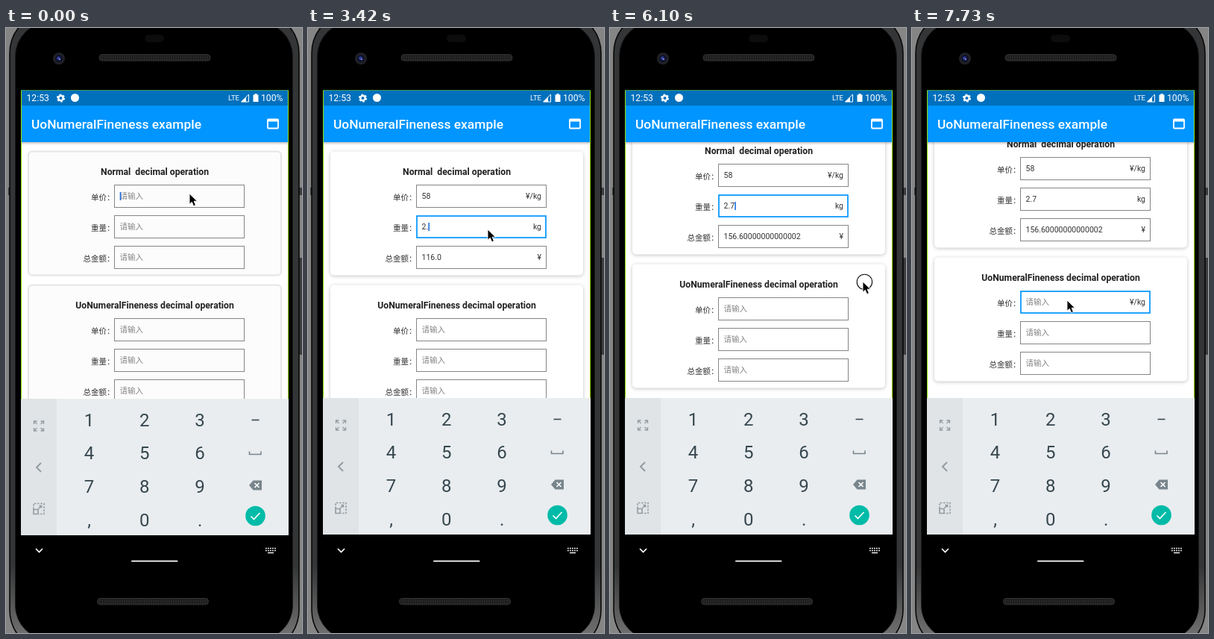
An HTML page for the animation above (8 s loop, 397 by 811 pixels).

```html
<!DOCTYPE html>
<html lang="zh-CN">
<head>
<meta charset="utf-8">
<title>Decimal operation demo</title>
<style>
  html, body { margin: 0; width: 100%; height: 100%; overflow: hidden; background: #858585; }
  svg { display: block; width: 397px; height: 811px; }
  text { font-family: Roboto, "Noto Sans CJK SC", "Noto Sans CJK", sans-serif; white-space: pre; }
  .bar { fill: #fff; font-size: 12.2px; }
  .title { fill: #fff; font-size: 17.4px; font-weight: 500; }
  .head { fill: #212121; font-size: 12.2px; font-weight: 700; text-anchor: middle; }
  .label, .value, .unit { fill: #333; font-size: 10.5px; }
  .label, .unit { text-anchor: end; }
  .empty { fill: #858585; }
  .box { fill: none; stroke: #858585; }
  .focus { stroke: #0095ff; stroke-width: 1.7; }
  .key { fill: #37474f; font-size: 24px; text-anchor: middle; }
  .line { fill: none; stroke-width: 1.6; }
  .card { fill: #fff; filter: drop-shadow(.5px 1px 2.5px rgba(0,0,0,.24)); }
  .flat .card { fill: #fcfcfc; stroke: #e5e5e5; stroke-width: 2; filter: none; }
</style>
</head>
<body>
<svg viewBox="0 0 397 811">
  <defs>
    <clipPath id="page"><rect x="20" y="153" width="359" height="344"/></clipPath>
    <pattern id="mesh" width="3" height="3" patternUnits="userSpaceOnUse">
      <rect width="3" height="3" fill="#292929"/><circle cx="1.5" cy="1.5" r=".9" fill="#111"/>
    </pattern>
    <linearGradient id="shade" x2="0" y2="1">
      <stop stop-color="#000" stop-opacity=".22"/><stop offset="1" stop-color="#000" stop-opacity="0"/>
    </linearGradient>
    <linearGradient id="metal" gradientUnits="userSpaceOnUse" x1="0" y1="720" x2="0" y2="811">
      <stop stop-color="#343537"/><stop offset="1" stop-color="#6e6e6e"/>
    </linearGradient>
  </defs>

  <!-- phone -->
  <rect width="397" height="811" fill="#858585"/>
  <g fill="#3c3d3e">
    <rect x="3" y="214" width="3" height="10"/>
    <rect x="393" y="214" width="4" height="10"/>
    <rect x="393" y="308" width="4" height="130"/>
  </g>
  <rect x="5" y="-22" width="388" height="858" rx="56" fill="url(#metal)" stroke="#080808" stroke-width="1.600"/>
  <rect x="12.5" y="-8" width="372" height="828" rx="46" fill="#000" stroke="#191a1b"/>
  <rect x="186" y="9" width="26" height="10" rx="5" fill="#0c0c0d"/>
  <rect x="125" y="35.500" width="149" height="8.500" rx="4" fill="url(#mesh)" stroke="#303030"/>
  <rect x="122.500" y="764.500" width="149" height="8.500" rx="4" fill="url(#mesh)" stroke="#303030"/>
  <circle cx="71" cy="41" r="8" fill="#202125"/>
  <circle cx="71" cy="41" r="5" fill="#10122b"/>
  <circle cx="70.500" cy="40.500" r="2.300" fill="#3443a0"/>
  <circle cx="72" cy="42" r="1" fill="#8d9be0"/>

  <!-- scrolling page -->
  <rect x="20" y="83" width="359" height="597" fill="#fff"/>
  <g clip-path="url(#page)"><g id="scroll"></g></g>

  <!-- status and title bars -->
  <rect x="20" y="83" width="359" height="21" fill="#0070bd"/>
  <rect x="20" y="104" width="359" height="49" fill="#0095ff"/>
  <rect x="20" y="153" width="359" height="4" fill="url(#shade)"/>
  <path d="M20.500 497V83.500H378.500V497" fill="none" stroke="#8fe000"/>
  <path d="M20 83.500H379" stroke="#3e9a50"/>
  <text class="bar" x="27.500" y="98.300">12:53</text>
  <g transform="translate(73.500 94)" stroke="#fff">
    <circle r="3.200" fill="none" stroke-width="2.400"/>
    <circle r="4.700" fill="none" stroke-width="1.800" stroke-dasharray="2.500 2.422"/>
  </g>
  <circle cx="92.500" cy="93.500" r="5.500" fill="#fff"/>
  <text class="bar" x="298" y="97.300" style="font-size:9.600px">LTE</text>
  <path d="M325.500 89V99H315.500Z" fill="none" stroke="#fff"/>
  <path d="M322 92.500V99H315.500Z" fill="#fff"/>
  <path d="M331.500 89.500h2v-1.500h3v1.500h2V99h-7Z" fill="#fff"/>
  <text class="bar" x="342" y="98.300">100%</text>
  <text class="title" x="34" y="135">UoNumeralFineness example</text>
  <rect x="351" y="122.500" width="14" height="12" rx="1" fill="none" stroke="#fff" stroke-width="1.800"/>
  <path d="M350.500 123.700h15" stroke="#fff" stroke-width="3.500"/>

  <!-- keyboard -->
  <rect x="20" y="679" width="359" height="50"/>
  <g id="keys">
    <rect x="20" y="496" width="359" height="183" fill="#e9edf0"/>
    <rect x="20" y="496" width="48" height="183" fill="#e0e4e7"/>
    <g class="line" stroke="#949ca1">
      <path stroke-width="1.300" d="M37.500 530v-4h4M37.500 526l4 4M46.500 526h4v4M50.500 526l-4 4M37.500 535v4h4M37.500 539l4-4M50.500 535v4h-4M50.500 539l-4-4"/>
      <path stroke-width="2" d="M47 582l-6 6 6 6"/>
      <path stroke-dasharray="2.500 1.700" d="M37 644v-7.500h14v14h-7"/>
      <path d="M37 644.500h6v6h-6ZM43.500 643.500l4-4M44.500 639.500h3v3"/>
    </g>
    <path class="line" stroke="#37474f" d="M329.500 524.500h10"/>
    <path class="line" stroke="#78858c" d="M326.500 566.500v4h15.500v-4"/>
    <path d="M331.500 605.500H343v13h-11.500l-5.500-6.500Z" fill="#78858c"/>
    <path class="line" stroke="#fff" d="M333.500 609l6 6m0-6l-6 6"/>
    <circle cx="334.500" cy="653" r="13.300" fill="#00bba8"/>
    <path class="line" stroke="#fff" stroke-width="2" d="M328.500 653.500l4 4 8-8.500"/>
  </g>
  <path class="line" stroke="#fff" d="M40 698l4.500 4.500L49 698"/>
  <rect x="168" y="713.700" width="62.500" height="1.800" rx=".9" fill="#fff"/>
  <path d="M348 697.500h14M348 700.500h14" stroke="#fff" stroke-width="1.600" stroke-dasharray="1.800 1.200"/>
  <path d="M351 703.500h8" stroke="#fff" stroke-width="1.400"/>

  <!-- pointer -->
  <g id="pointer">
    <circle id="ring" cx="2.400" cy=".4" r="10.200" fill="none" stroke="#111" stroke-width="1.100"/>
    <path d="M0 0V14.300L3.300 11.300L5.600 16.700L8.400 15.500L6.100 10.200H10.500Z" fill="#000" stroke="#fff" stroke-width=".9"/>
  </g>
</svg>
<script>
const NS = 'http://www.w3.org/2000/svg';
const $ = id => document.getElementById(id);
const LOOP = 8000;
const HINT = '请输入';
const LABELS = ['单价：', '重量：', '总金额：'];
const UNITS = ['¥/kg', 'kg', '¥'];

function add(parent, tag, attrs, text = '') {
  const el = document.createElementNS(NS, tag);
  for (const k in attrs) el.setAttribute(k, attrs[k]);
  el.textContent = text;
  parent.append(el);
  return el;
}

const fields = [];
function addCard(y, heading) {
  const g = add($('scroll'), 'g', { transform: `translate(0 ${y})` });
  add(g, 'rect', { class: 'card', x: 30, y: 0.5, width: 339, height: 166, rx: 5 });
  add(g, 'text', { class: 'head', x: 199.5, y: 31.5 }, heading);
  LABELS.forEach((label, i) => {
    const row = add(g, 'g', { transform: `translate(0 ${45 + 41 * i})` });
    add(row, 'text', { class: 'label', x: 145.5, y: 20.8 }, label);
    fields.push({
      box: add(row, 'rect', {}),
      value: add(row, 'text', { x: 152.5, y: 19.2 }),
      unit: add(row, 'text', { class: 'unit', x: 313, y: 19.2 }, UNITS[i]),
      caret: add(row, 'rect', { y: 10, width: 1.6, height: 11, fill: '#1f6fe0' })
    });
  });
}
addCard(165, 'Normal  decimal operation');
addCard(344, 'UoNumeralFineness decimal operation');

['123', '456', '789', ',0.'].forEach((row, r) => [...row].forEach((c, i) =>
  add($('keys'), 'text', { class: 'key', x: 111.5 + 74.3 * i, y: 532.5 + 44.7 * r }, c)));

// Each step changes part of the state and holds until the next one.
const start = { ready: false, focus: 0, caret: true, price: '', weight: '', scroll: 0, at: [246, 222], ring: false };
const steps = [
  [0, {}],
  [150, { ready: true }],
  [600, { caret: false }],
  [1050, { caret: true }],
  [1500, { caret: false }],
  [1640, { price: '5', caret: true }],
  [1790, { price: '58' }],
  [2240, { caret: false }],
  [2390, { at: [245, 238] }],
  [2540, { at: [242, 262] }],
  [2680, { at: [241, 270], ring: true, caret: true }],
  [2830, { focus: 1 }],
  [2980, { ring: false }],
  [3270, { weight: '2' }],
  [3420, { weight: '2.' }],
  [3870, { weight: '2.7' }],
  [4310, { caret: false, at: [256, 330] }],
  [4460, { at: [296, 500] }],
  [4610, { at: [326, 609] }],
  [4750, { caret: true, at: [328, 540] }],
  [4900, { at: [328, 440] }],
  [5200, { caret: false, at: [330, 410] }],
  [5350, { at: [332, 390] }],
  [5500, { at: [333, 380] }],
  [5650, { caret: true, at: [333, 378] }],
  [5800, { ring: true }],
  [5950, { at: [336, 360], scroll: 11 }],
  [6100, { at: [339, 340], scroll: 28 }],
  [6250, { at: [340, 330], scroll: 37 }],
  [6400, { ring: false }],
  [6700, { at: [268, 352] }],
  [6850, { at: [212, 372] }],
  [7000, { at: [208, 365] }],
  [7140, { ring: true }],
  [7290, { ring: false, focus: 3 }],
  [7730, { caret: false }]
];

function total(a, b) {
  if (!a || !b) return '';
  const n = parseFloat(a) * parseFloat(b);
  return Number.isInteger(n) ? n.toFixed(1) : String(n);
}

const show = (el, on) => el.setAttribute('visibility', on ? 'visible' : 'hidden');

function drawField(f, i, s, text) {
  const active = s.focus === i;
  const lit = active && s.ready;
  const [x, y, width, height] = lit ? [146, 1, 173, 29] : [145.5, 0.5, 174, 30];
  Object.entries({ x, y, width, height, class: lit ? 'box focus' : 'box' })
    .forEach(([k, v]) => f.box.setAttribute(k, v));
  f.value.textContent = text || HINT;
  f.value.setAttribute('class', text ? 'value' : 'value empty');
  f.caret.setAttribute('x', 152.7 + (text ? f.value.getComputedTextLength() : 0));
  show(f.unit, lit || text);
  show(f.caret, active && s.caret);
}

let last = -1;
function frame() {
  const t = performance.now() % LOOP;
  const n = steps.filter(([at]) => at <= t).length;
  if (n !== last) {
    last = n;
    const s = Object.assign({}, start, ...steps.slice(0, n).map(step => step[1]));
    const values = [s.price, s.weight, total(s.price, s.weight)];
    fields.forEach((f, i) => drawField(f, i, s, values[i] || ''));
    $('scroll').setAttribute('transform', `translate(0 ${-s.scroll})`);
    $('scroll').setAttribute('class', s.ready ? '' : 'flat');
    $('keys').setAttribute('transform', `translate(0 ${s.ready ? 0 : 1})`);
    $('pointer').setAttribute('transform', `translate(${s.at})`);
    show($('ring'), s.ring);
  }
  requestAnimationFrame(frame);
}
frame();
</script>
</body>
</html>
```
